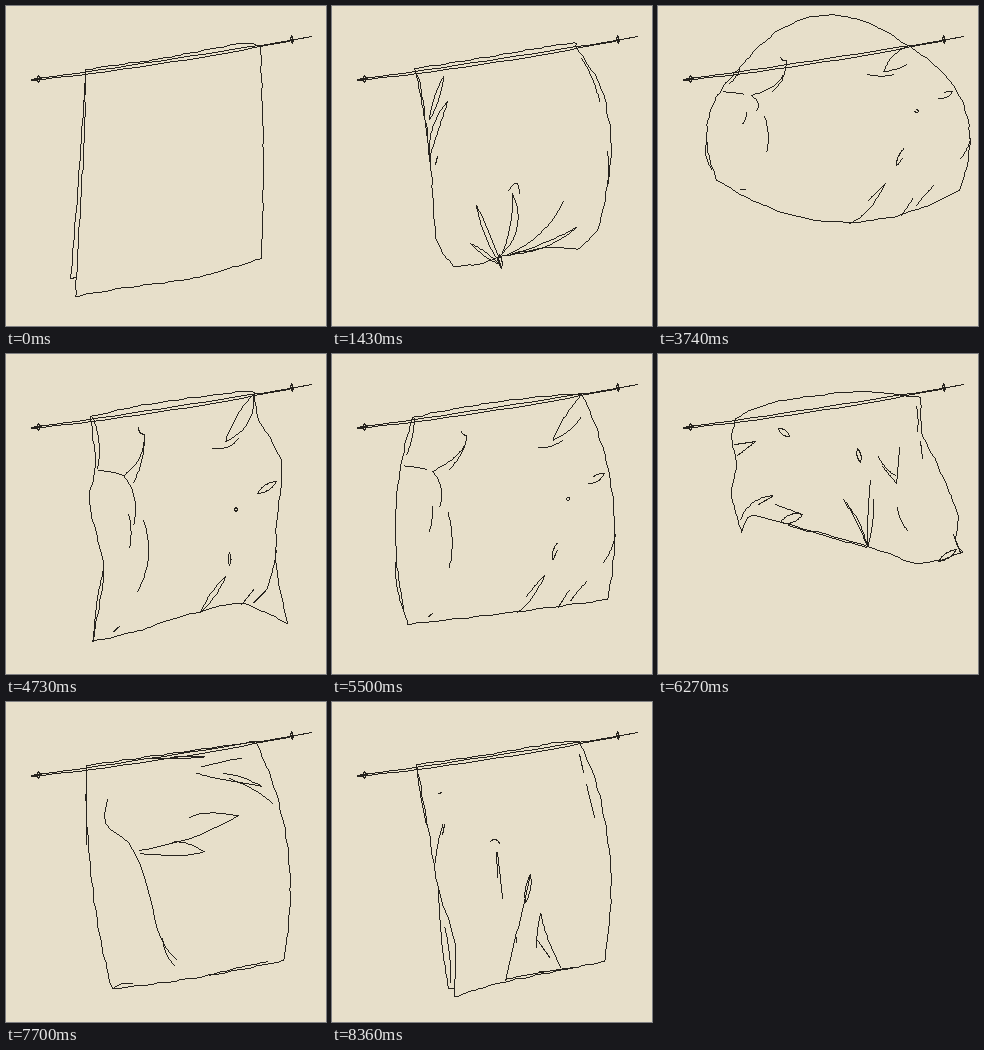
An HTML page with a canvas that plays this animation: 320x320 px, repeating every 8470 ms.

```html
<!DOCTYPE html>
<html lang="en">
<head>
<meta charset="utf-8">
<title>Cloth on a line</title>
<style>
html, body { margin: 0; width: 100%; height: 100%; overflow: hidden; background: #e7dfca; }
canvas { display: block; width: 100%; height: 100%; image-rendering: pixelated; }
</style>
</head>
<body>
<canvas width="320" height="320"></canvas>
<script>
const STEP = 110, TICKS = 77, SAMPLES = 60;
const PAPER = '#e7dfca', INK = '#26231e';
const PEGS = [[80, 63], [249, 39]];
const ctx = document.querySelector('canvas').getContext('2d');

const mix = (a, b, u) => [a[0] + (b[0] - a[0]) * u, a[1] + (b[1] - a[1]) * u];
const range = (n, f) => Array.from({ length: n + 1 }, (_, i) => f(i / n, i));

// Line from a to b, bowed to its right-hand side by bend.
function arc(a, b, bend = 0) {
  const dx = b[0] - a[0], dy = b[1] - a[1], k = 4 * bend / Math.hypot(dx, dy);
  return range(24, u => {
    const [x, y] = mix(a, b, u), h = k * u * (1 - u);
    return [x - dy * h, y + dx * h];
  });
}

// Creases are "x y x y bend width"; a width opens the stroke into a leaf.
function strokes(text) {
  return text.split(', ').map(s => {
    const [x, y, x2, y2, bend = 0, width = 0] = s.split(' ').map(Number);
    const a = [x, y], b = [x2, y2], side = arc(a, b, bend + width / 2);
    return width ? side.concat(arc(a, b, bend - width / 2).reverse()) : side;
  });
}

// Smooth curve through a few points.
function spline(p) {
  const at = i => p[Math.max(0, Math.min(p.length - 1, i))];
  return p.slice(1).flatMap((q, i) => range(8, u => {
    const v = 1 - u;
    return [0, 1].map(c => p[i][c] * v * v * (1 + 2 * u) + q[c] * u * u * (3 - 2 * u)
      + .4 * u * v * (v * (q[c] - at(i - 1)[c]) - u * (at(i + 2)[c] - p[i][c])));
  }));
}

// Spreads points evenly along an edge so that poses can be blended.
function even(line) {
  const len = [0];
  for (let i = 1; i < line.length; i++)
    len.push(len[i - 1] + Math.hypot(line[i][0] - line[i - 1][0], line[i][1] - line[i - 1][1]));
  let j = 1;
  return range(SAMPLES, u => {
    const d = len.at(-1) * u;
    while (j < line.length - 1 && len[j] < d) j++;
    return mix(line[j - 1], line[j], (d - len[j - 1]) / (len[j] - len[j - 1] || 1));
  });
}

// Edges run clockwise from the top left, each starting at its corner.
function drawn(tick, shape, creases) {
  const sides = shape.split('|').map(e => e.split(' ').map(s => s.split(',').map(Number)));
  const edge = sides.flatMap((e, i) => even(spline([...e, sides[(i + 1) % 4][0]])));
  return { tick, edge, creases: strokes(creases) };
}

// Plain sheet between two pegs, given its lower corners and how far each edge swells.
function swell(tick, right, left, ...bulge) {
  const corners = [...PEGS, right, left];
  return { tick, edge: corners.flatMap((c, i) => even(arc(c, corners[(i + 1) % 4], -bulge[i]))) };
}

const poses = [
  drawn(0, '79,63 155,52 235,37|254,40 257,150|255,252 190,271 120,281|69,290 74,200 78,130',
    '79 63 64 272 -1, 64 272 69 271'),
  swell(2, [254, 255], [58, 298], 0, 4, 0, 0),
  swell(4, [252, 262], [82, 311], 0, 7, 0, 2),
  swell(7, [262, 250], [118, 315], 0, 11, 5, 8),
  drawn(13, '82,62 140,53 235,37|243,40 269,82 279,140 272,195 264,224|245,243 215,241 165,251 150,257|121,260 104,232 98,155 89,85',
    '97 113 111 70 0 5, 97 150 115 95 -3 6, 82 62 97 155 -2, 103 158 105 150, 249 52 267 95 -2, ' +
    '275 145 275 178 -1, 168 258 144 199 -1 5, 169 248 180 187 7 7, 176 184 187 187 -9, ' +
    '167 258 138 237 0 4, 175 248 231 195 7, 178 248 244 221 4 4, 167 248 169 262 0 3'),
  swell(18, [262, 262], [100, 291], 4, 17, -4, 14),
  drawn(24, '72,66 85,57 145,44 220,37|250,40 264,65 273,115 288,162 281,185 278,215|280,234 246,246 258,276 225,260 210,258 237,243 175,220 142,215|88,183 58,137 68,105',
    '62 143 73 110 -3, 73 110 89 180 -2, 84 140 97 156 0 5, 120 128 140 142, 145 146 243 184 4, ' +
    '141 214 141 186 0 6, 245 184 251 163 0 5, 250 183 282 180 1, 244 184 231 194 -2, ' +
    '231 194 240 210 4, 240 210 238 243, 245 184 241 235, 281 182 266 234 -2, 266 234 280 234, ' +
    '265 215 266 208, 253 73 254 77, 250 40 270 125 -1'),
  swell(29, [308, 175], [52, 140], 37, 25, 34, 17),
  swell(35, [300, 185], [60, 180], 43, 34, 38, 21),
  swell(39, [305, 220], [85, 280], 12, 30, 10, 18),
  drawn(43, '84,62 140,50 235,37|248,38 252,65 275,108 270,170 270,215|281,269 235,249 190,258 158,267 130,277|86,287 97,215 83,150 89,110',
    '86 63 91 114 -4, 92 116 117 121 -1, 117 121 138 80 6, 138 80 127 128 -3, 138 80 132 73 -2, ' +
    '117 121 127 170 -6, 122 160 123 193 -2, 137 166 131 237 -8, 247 40 219 87 -3 13, ' +
    '206 94 232 84 4, 251 139 270 127 0 6, 228 155 231 155 0 4, 223 198 223 211 0 3, ' +
    '194 258 219 222 0 5, 235 250 247 235, 247 248 259 236, 270 196 260 235 -1, 97 215 87 287 2, 107 277 113 272'),
  swell(49, [270, 255], [75, 288], 2, 18, -2, 16),
  swell(53, [290, 215], [75, 215], 8, 18, 10, 10),
  drawn(57, '77,64 92,56 125,46 200,37|262,43 264,80 278,108 299,160 297,185|304,198 260,209 210,192 108,164 90,163|83,178 73,140 78,110 73,85',
    '76 90 97 87, 97 87 79 101, 82 165 114 141 -6, 100 150 114 142, 117 150 144 160, ' +
    '122 168 144 160 0 8, 120 74 131 82 0 5, 199 94 202 108 0 4, 220 102 237 121 2, 241 93 238 129, ' +
    '224 112 238 129, 212 126 209 192 1, 185 145 209 192 -2 2, 215 145 209 192 -2, 239 153 249 176 2, ' +
    '258 52 259 77 -1, 262 87 264 104, 280 207 298 195 0 5, 295 180 302 198, 130 171 208 193'),
  swell(60, [317, 160], [120, 155], 18, 25, 14, 10),
  drawn(64, '69,64 130,54 200,44|225,41 257,73 295,95|316,134 285,132 255,133 200,142|176,148 128,104 121,88 105,76',
    '110 68 256 133, 72 66 121 92 -6, 158 88 221 81 0 6, 160 89 208 90 0 3, 173 67 233 66 1 3, ' +
    '205 68 256 74 -1, 176 63 222 53, 130 56 178 55 0 2, 208 111 230 127, 178 146 197 142 -3, 255 133 316 134 -4'),
  swell(69, [284, 262], [128, 280], 0, 22, 4, 10),
  swell(72, [262, 250], [60, 299], 0, 12, 0, 4),
  drawn(76, '84,62 150,53 225,40|247,39 265,85 277,150 278,205|272,259 242,265 165,281|122,294 122,240 106,186 93,110',
    '84 62 94 122 1, 106 186 116 286 2, 116 286 121 286, 112 225 118 280 -2, 102 165 110 122 -1, ' +
    '110 132 112 122, 106 91 109 90, 158 139 167 141 -3, 165 150 170 196, 164 150 165 175, ' +
    '173 278 198 172, 193 200 198 172 0 5, 184 235 184 240, 228 265 208 211 -2, 204 245 208 211 -1, ' +
    '205 238 217 255, 173 277 242 265 -1, 207 269 212 269, 247 52 251 70, 254 82 262 115')
];
const creased = poses.filter(p => p.creases);
const rod = strokes('25 74 305 30 3.5, 25 73 300 31 1, 28 73 35 72, 32 69 32 76 0 3, 282 34 288 33, 285 29 286 37 0 2');

function outline(tick) {
  const i = Math.max(1, poses.findIndex(p => p.tick >= tick));
  const a = poses[i - 1], b = poses[i], u = (tick - a.tick) / (b.tick - a.tick);
  return a.edge.map((p, k) => mix(p, b.edge[k], u));
}

// Carries a crease point along with the nearest parts of the outline.
function carry([x, y], from, to) {
  let sum = 0, dx = 0, dy = 0;
  from.forEach(([px, py], i) => {
    const w = 1 / ((px - x) ** 2 + (py - y) ** 2 + 1) ** 2;
    sum += w;
    dx += w * (to[i][0] - px);
    dy += w * (to[i][1] - py);
  });
  return [x + dx / sum, y + dy / sum];
}

// One-pixel line without smoothing.
function draw(line) {
  for (let i = 1; i < line.length; i++) {
    const [a, b] = [line[i - 1], line[i]].map(p => p.map(Math.round));
    const n = Math.max(Math.abs(b[0] - a[0]), Math.abs(b[1] - a[1]), 1);
    range(n, u => ctx.fillRect(...mix(a, b, u).map(Math.round), 1, 1));
  }
}

function render(tick) {
  ctx.fillStyle = PAPER;
  ctx.fillRect(0, 0, 320, 320);
  ctx.fillStyle = INK;
  rod.forEach(draw);
  const edge = outline(tick);
  draw(edge.map(([x, y], i) => [x + .4 * Math.sin(i * .9 + tick), y + .4 * Math.sin(i * .7 + tick * 2)]));
  const gap = p => Math.abs(p.tick - tick);
  const near = creased.reduce((a, b) => gap(b) < gap(a) ? b : a);
  const part = 1 - gap(near) / 30; // creases shorten away from their pose
  near.creases.forEach(c =>
    draw(c.slice(0, Math.ceil(c.length * part)).map(p => carry(p, near.edge, edge))));
}

let shown = -1;
function loop() {
  let tick = Math.floor(performance.now() / STEP) % TICKS;
  if (tick < 6) tick -= tick % 2; // slow start, two ticks per drawing
  if (tick !== shown) render(shown = tick);
  requestAnimationFrame(loop);
}
loop();
</script>
</body>
</html>
```
